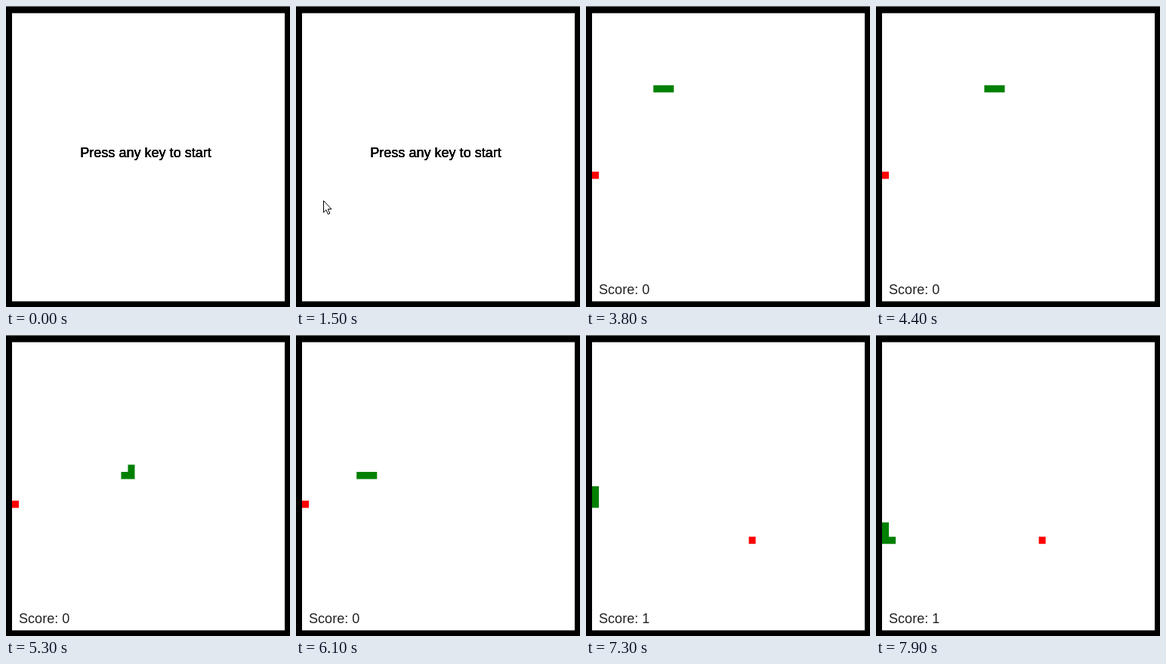
Animation of 376 by 398 pixels, one loop 8 s. Source, as an HTML page with a canvas:

```html
<!DOCTYPE html>
<html lang="en">
<head>
<meta charset="utf-8">
<title>Snake</title>
<style>
  html, body { margin: 0; width: 100%; height: 100%; overflow: hidden; background: #000; }
  canvas { display: block; }
</style>
</head>
<body>
<canvas id="stage" width="376" height="398"></canvas>
<script>
const ctx = document.getElementById('stage').getContext('2d');

const LOOP = 8000, STEP = 100, PLAY = 3800;
const CELL = 10;                 // board is 400 x 400 units
const EAT = 35;                  // step on which the food is reached
const START = [11, 10];
const MOVES = [[1, 0, 6], [0, 1, 8], [-1, 0, 17], [0, 1, 9], [1, 0, 9]];  // dx, dy, steps

// Head position after n steps; negative n gives the initial tail.
function headAt(n) {
  let [x, y] = START;
  if (n < 0) return [x + n, y];
  for (const [dx, dy, len] of MOVES) {
    const k = Math.min(n, len);
    x += dx * k;
    y += dy * k;
    n -= k;
  }
  return [x, y];
}

function drawCells(cells, color) {
  ctx.fillStyle = color;
  ctx.beginPath();
  for (const [x, y] of cells) ctx.rect(x * CELL, y * CELL, CELL, CELL);
  ctx.fill();
}

function drawText(text, x, y, color) {
  ctx.font = '20px "Liberation Sans", Arial, sans-serif';
  ctx.fillStyle = color;
  ctx.fillText(text, x, y);
}

function drawTitle() {
  // Repeated passes thicken the antialiased edges.
  for (let i = 0; i < 4; i++) drawText('Press any key to start', 100, 200, '#000');
}

function drawGame(n) {
  const eaten = n >= EAT;
  const length = n > EAT ? 4 : 3;
  drawCells([eaten ? [23, 27] : [0, 22]], '#f00');
  drawCells(Array.from({ length }, (_, i) => headAt(n - i)), '#008000');
  drawText('Score: ' + (eaten ? 1 : 0), 10, 390, '#222');
}

function drawPointer(t) {
  if (t < 1500 || t >= 2200) return;
  const k = Math.max(0, Math.floor((t - 1700) / STEP));
  ctx.save();
  ctx.translate(36 + 80 * k, 257 - 7 * Math.sin(k * Math.PI / 4));
  const arrow = new Path2D('M.5 .5V16L4 12.6L6.4 18.3L8.8 17.3L6.4 11.6H11Z');
  ctx.fillStyle = '#fff';
  ctx.strokeStyle = '#000';
  ctx.fill(arrow);
  ctx.stroke(arrow);
  ctx.restore();
}

function draw(t) {
  ctx.setTransform(1, 0, 0, 1, 0, 0);
  ctx.fillStyle = '#000';
  ctx.fillRect(0, 0, 376, 398);
  ctx.fillStyle = '#777';
  ctx.fillRect(0, 0, 376, 1);

  ctx.setTransform(0.9025, 0, 0, 0.9525, 8, 9.5);
  ctx.fillStyle = '#fff';
  ctx.fillRect(0, 0, 400, 400);
  if (t < PLAY) drawTitle();
  else drawGame(Math.floor((t - PLAY) / STEP));

  ctx.setTransform(1, 0, 0, 1, 0, 0);
  drawPointer(t);
}

const begin = performance.now();
function tick() {
  draw((performance.now() - begin) % LOOP);
  requestAnimationFrame(tick);
}
tick();
</script>
</body>
</html>
```
